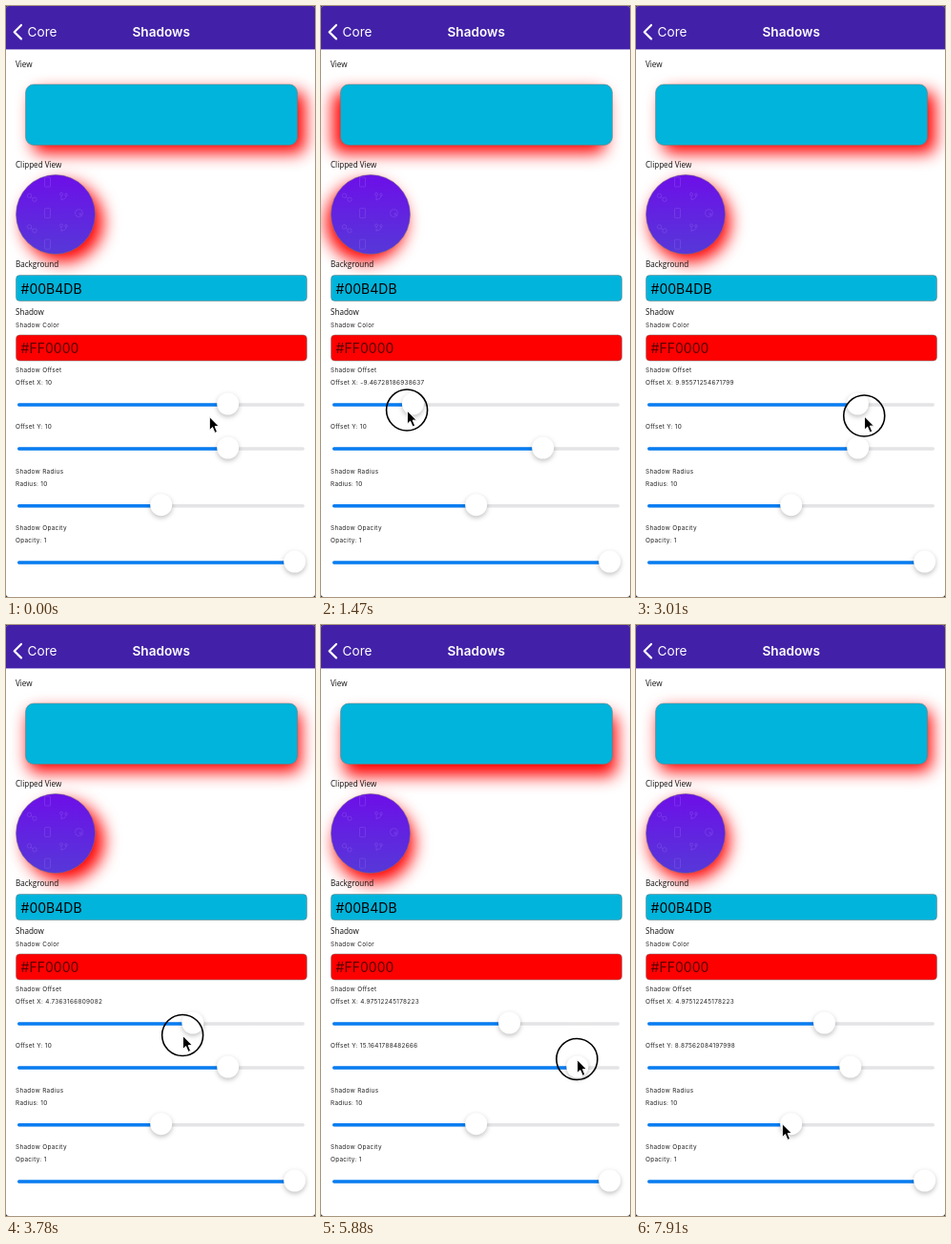
Animation, 324 px wide and 618 px high, one loop 8 s. Source, as an HTML page:

```html
<!DOCTYPE html>
<html lang="en">
<head>
<meta charset="utf-8">
<title>Shadows</title>
<style>
  html, body { margin: 0; width: 100%; height: 100%; overflow: hidden; background: #222; }
  svg { display: block; width: 324px; height: 618px; border-radius: 3px; background: #fff; }
  text { font-family: Inter, Roboto, sans-serif; }
  .nav { font-size: 13.6px; fill: #fff; }
  .title { font-weight: 600; text-anchor: middle; }
  .label { font: 8.1px "Open Sans", "Noto Sans", sans-serif; fill: #111; }
  .note { font-size: 6.4px; letter-spacing: .3px; fill: #222; }
  .entry { font-size: 14px; }
  .edge { stroke: #777; stroke-opacity: .5; }
  .icons { fill: none; stroke: #a06cf0; stroke-opacity: .32; stroke-width: .9; }
  .thumb { fill: #fff; filter: drop-shadow(0 2px 2.5px rgba(0, 0, 0, .25)); }
</style>
</head>
<body>
<svg viewBox="0 0 324 618">
  <defs>
    <linearGradient id="violet" x2="0" y2="1">
      <stop stop-color="#6d0fe8"/>
      <stop offset="1" stop-color="#5638d8"/>
    </linearGradient>
    <g id="phone"><rect x="-3" y="-5" width="6" height="10" rx="1"/></g>
    <g id="branch"><path d="M-2 -2V3M-2 2Q3 2 3 -2"/><circle cx="-2" cy="-3.5" r="1.5"/><circle cx="3" cy="-3" r="1.3"/></g>
    <g id="link"><circle cx="-2.5" cy="-2" r="2.2"/><circle cx="3" cy="2" r="2.2"/><path d="M-1 -1L1 1"/></g>
    <g id="palette"><circle r="4"/><circle cx="1.5" cy="1" r="1"/></g>
  </defs>

  <rect id="view" class="edge" x="20.5" y="82" width="285" height="63.5" rx="8.5" fill="#00b4db"/>
  <circle id="disc" class="edge" cx="52" cy="218" r="41.5" fill="url(#violet)"/>
  <g id="icons" class="icons"></g>

  <rect width="324" height="45.4" fill="#4221a8"/>
  <path d="M16 20L8.7 27.2L16 34.4" fill="none" stroke="#fff" stroke-width="2.2" stroke-linecap="round" stroke-linejoin="round"/>
  <text class="nav" x="22.6" y="32">Core</text>
  <text class="nav title" x="162.7" y="32">Shadows</text>

  <text class="label" x="10" y="64.3">View</text>
  <text class="label" x="10" y="168.8">Clipped View</text>
  <text class="label" x="10" y="273.3">Background</text>
  <text class="label" x="10" y="323">Shadow</text>

  <rect class="edge" x="10.5" y="281.5" width="305" height="27" rx="4" fill="#00b4db"/>
  <text class="entry" x="15.6" y="300.5">#00B4DB</text>
  <rect class="edge" x="10.5" y="344" width="305" height="27" rx="4" fill="#f00"/>
  <text class="entry" x="15.6" y="363" fill="#500">#FF0000</text>

  <text class="note" x="10" y="336.4">Shadow Color</text>
  <text class="note" x="10" y="382.9">Shadow Offset</text>
  <text class="note" x="10" y="488.9">Shadow Radius</text>
  <text class="note" x="10" y="548.4">Shadow Opacity</text>

  <g id="sliders"></g>

  <g id="cursor">
    <circle id="ring" r="21.5" fill="none" stroke="#000" stroke-width="1.6"/>
    <path d="M.3 .6v14l3.2 -3l2.5 5.8l2.5 -1.1l-2.4 -5.7h4.2z" stroke="#fff"/>
  </g>
</svg>
<script>
const LOOP = 8000, STEP = 70, LAST_STEP = 7910;
const POINT = 0.83;      // stage pixels per shadow unit
const HAND_LEAD = 60;    // the thumb trails the cursor
const DISC_LAG = 200;    // the clipped view's shadow trails its value

const byId = id => document.getElementById(id);
const mix = (a, b, u) => a + (b - a) * u;
const ease = (t, start, end) => {
  const u = Math.min(Math.max((t - start) / (end - start), 0), 1);
  return u * u * (3 - 2 * u);
};

// Smooth curve through [time, value] points that never overshoots them.
function curve(points) {
  const last = points.length - 1;
  const secant = i => (points[i + 1][1] - points[i][1]) / (points[i + 1][0] - points[i][0]);
  const slope = i => {
    if (i === 0 || i === last) return 0;
    const a = secant(i - 1), b = secant(i);
    return a * b > 0 ? 2 * a * b / (a + b) : 0;
  };
  return t => {
    if (t <= points[0][0]) return points[0][1];
    if (t >= points[last][0]) return points[last][1];
    const i = points.findIndex(point => point[0] > t) - 1;
    const [start, from] = points[i], [end, to] = points[i + 1];
    const u = (t - start) / (end - start);
    return mix(from, to, ease(t, start, end))
      + (end - start) * u * (1 - u) * (slope(i) * (1 - u) - slope(i + 1) * u);
  };
}

const offsetX = curve([
  [420, 10], [840, 3.50248670578003], [1750, -12], [2170, -6.72637033462524],
  [3430, 14], [3780, 4.7363166809082], [4060, -1], [4550, 4.97512245178223]
]);
const offsetY = curve([[4900, 10], [5180, 2], [5880, 15.1641788482666], [6860, 8.87562084197998]]);
const thumbX = (value, min = -20, max = 20) => 22.7 + 280 * (value - min) / (max - min);

// Each move carries the cursor from wherever it is onto a new, possibly moving, position.
function cursorAt(t) {
  const hand = t + HAND_LEAD;
  const moves = [
    [0, 400, thumbX(offsetX(hand)), 420],
    [420, 3420, thumbX(offsetX(hand)), 429],
    [4550, 4830, 194, 462],
    [4900, 5180, thumbX(offsetY(hand)), 458],
    [5180, 5880, thumbX(offsetY(hand)), 454],
    [7280, LAST_STEP, 153, 521]
  ];
  return moves.reduce(([x, y], [start, end, toX, toY]) => {
    const u = ease(t, start, end);
    return [mix(x, toX, u), mix(y, toY, u)];
  }, [213, 429]);
}

function makeSlider(name, y, labelY, min, max) {
  const group = document.createElementNS("http://www.w3.org/2000/svg", "g");
  group.innerHTML = `
    <text class="note" x="10" y="${labelY}"></text>
    <rect x="12" y="${y - 1.7}" width="301" height="3.4" rx="1.7" fill="#e4e4e6"/>
    <rect x="12" y="${y - 1.7}" height="3.4" rx="1.7" fill="#087df2"/>
    <circle class="thumb" cy="${y - 1}" r="11.5"/>`;
  byId("sliders").append(group);
  const [label, , fill, thumb] = group.children;
  return value => {
    const x = thumbX(value, min, max);
    label.textContent = `${name}: ${Number(value.toPrecision(15))}`;
    fill.setAttribute("width", x - 12);
    thumb.setAttribute("cx", x);
  };
}

const setOffsetX = makeSlider("Offset X", 417, 395.9, -20, 20);
const setOffsetY = makeSlider("Offset Y", 463, 442.4, -20, 20);
makeSlider("Radius", 522.7, 501.9, 0, 20)(10);
makeSlider("Opacity", 582, 561.4, 0, 1)(1);

// Checkerboard of icons, one kind per column, kept inside the disc.
["link", "phone", "branch", "palette"].forEach((icon, column) => {
  for (let row = (column + 1) % 2; row < 5; row += 2) {
    const x = 27 + 16.5 * column, y = 184 + 16.3 * row;
    if (Math.hypot(x - 52, y - 218) < 38) {
      byId("icons").innerHTML += `<use href="#${icon}" x="${x}" y="${y}"/>`;
    }
  }
});

function castShadow(id, t) {
  byId(id).style.filter =
    `drop-shadow(${offsetX(t) * POINT}px ${offsetY(t) * POINT}px ${10 * POINT}px #f00)`;
}

function draw(now) {
  const t = Math.min(Math.floor(now % LOOP / STEP) * STEP, LAST_STEP);
  setOffsetX(offsetX(t));
  setOffsetY(offsetY(t));
  castShadow("view", t);
  castShadow("disc", t - DISC_LAG);

  const pressed = (t >= 420 && t < 4550) || (t >= 4830 && t < 6900);
  byId("ring").style.display = pressed ? "" : "none";
  byId("cursor").setAttribute("transform", `translate(${cursorAt(t)})`);
}

const start = performance.now();
function tick() {
  draw(performance.now() - start);
  requestAnimationFrame(tick);
}
tick();
</script>
</body>
</html>
```
